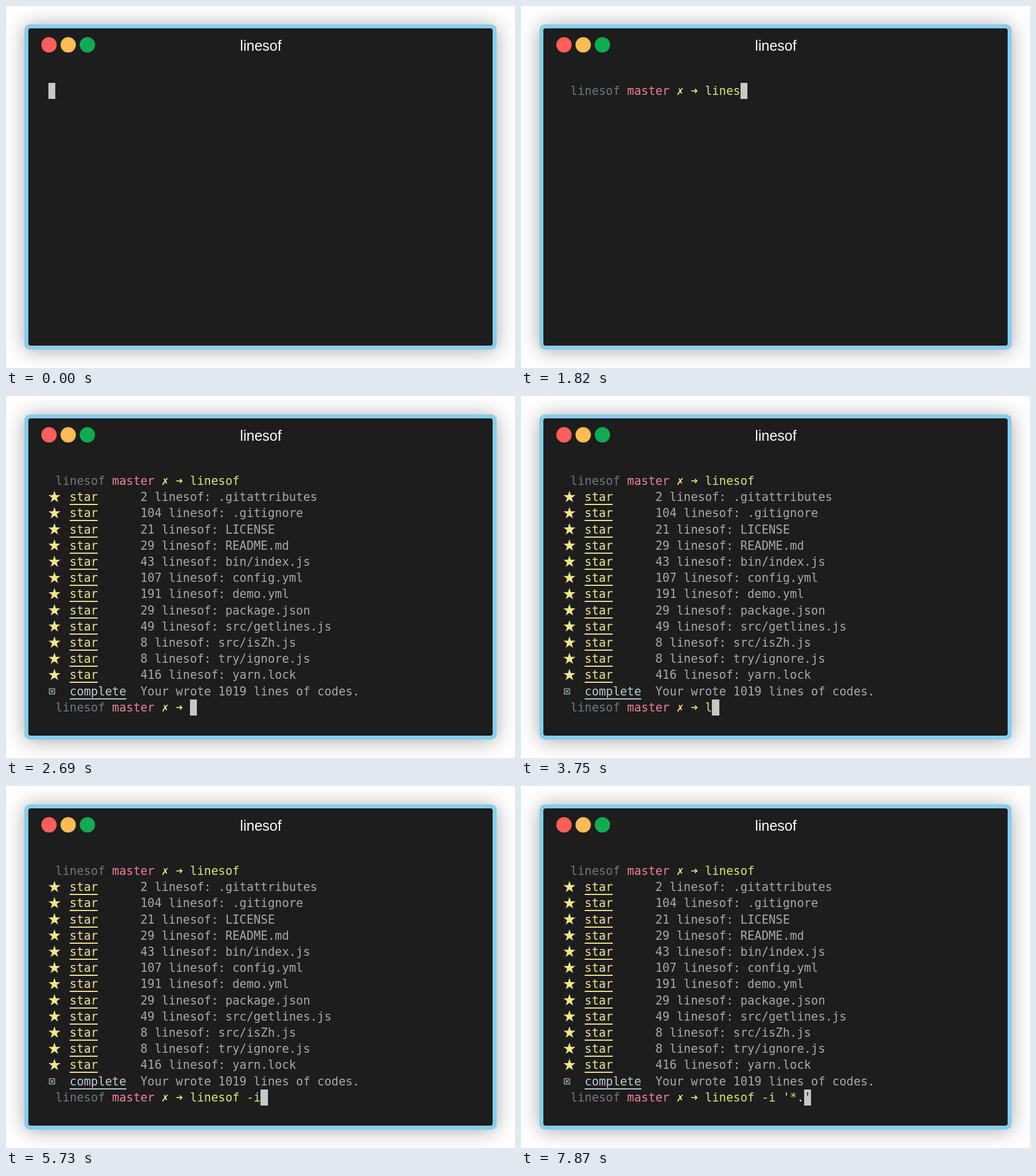
Animation of 888x631 px, one loop 8000 ms. Source, as an HTML page with a canvas:

```html
<!DOCTYPE html>
<html lang="en">
<head>
<meta charset="utf-8">
<title>linesof</title>
<style>
html, body { margin: 0; width: 888px; height: 631px; overflow: hidden; background: #fff; }
canvas { display: block; }
</style>
</head>
<body>
<canvas id="stage" width="888" height="631"></canvas>
<script>
const ctx = document.getElementById('stage').getContext('2d');
const LOOP = 8000;
const LEFT = 74, TOP = 134, CELL = 12.345, ROW = 28.2;
const MONO = '20.5px "DejaVu Sans Mono", monospace';
const COLOR = {
  page: '#fff', border: '#87ceeb', panel: '#1d1d1d', title: '#fff', cursor: '#c5c8c6',
  dim: '#70787a', branch: '#f07f9c', star: '#f0e68c', command: '#d2e878',
  text: '#a9a9a9', done: '#b5cfca'
};

const FILES = [
  [2, '.gitattributes'], [104, '.gitignore'], [21, 'LICENSE'], [29, 'README.md'],
  [43, 'bin/index.js'], [107, 'config.yml'], [191, 'demo.yml'], [29, 'package.json'],
  [49, 'src/getlines.js'], [8, 'src/isZh.js'], [8, 'try/ignore.js'], [416, 'yarn.lock']
];

// Each keystroke: [time, command line]; "|" places the cursor inside the text.
const typed = (text, times) => times.map((time, i) => [time, text.slice(0, i + 1)]);
const FIRST = [[20, ''], ...typed('linesof', [890, 1090, 1150, 1220, 1820, 1930, 2040])];
const SECOND = [
  [2690, ''],
  ...typed("linesof -i '", [3750, 3910, 3960, 4010, 4200, 4440, 4540, 4780, 4870, 5730, 5980, 6100]),
  [6240, "linesof -i ''"], [6560, "linesof -i '|'"], [6920, "linesof -i '*|'"],
  [7320, "linesof -i '*.|'"], [7580, "linesof -i '*|'"], [7870, "linesof -i '*.|'"]
];
// Printed lines over time; 13 includes the summary.
const OUTPUT = [[0, 0], [2300, 1], [2370, 4], [2470, 9], [2580, 13]];

const at = (steps, t) => steps.reduce((value, [time, next]) => t >= time ? next : value, undefined);
const colX = col => LEFT + col * CELL;
const rowY = row => TOP + row * ROW;

function print(text, col, row, color) {
  ctx.font = MONO;
  ctx.textAlign = 'left';
  ctx.fillStyle = color;
  [...text].forEach((char, i) => ctx.fillText(char, colX(col + i), rowY(row) + 21));
}

function underlined(text, col, row, color) {
  print(text, col, row, color);
  ctx.fillRect(Math.round(colX(col)), Math.round(rowY(row) + 26), Math.round(text.length * CELL), 2);
}

function cursor(col, row) {
  const x = Math.round(colX(col)), y = Math.round(rowY(row));
  ctx.fillStyle = COLOR.cursor;
  ctx.fillRect(x, y, Math.round(colX(col + 1)) - x, 28);
}

function star(row) {
  const x = 84.5, y = rowY(row) + 14;
  ctx.beginPath();
  for (let i = 0; i < 10; i++) {
    const r = i % 2 ? 4.3 : 11, a = i * Math.PI / 5;
    ctx.lineTo(x + r * Math.sin(a), y - r * Math.cos(a));
  }
  ctx.fillStyle = COLOR.star;
  ctx.fill();
}

function checkbox(row) {
  const x = 75.5, y = rowY(row) + 9.5, size = 9.5;
  ctx.strokeStyle = COLOR.done;
  ctx.lineWidth = 1.1;
  ctx.strokeRect(x, y, size, size);
  ctx.beginPath();
  ctx.moveTo(x + 2, y + 2);
  ctx.lineTo(x + size - 2, y + size - 2);
  ctx.moveTo(x + size - 2, y + 2);
  ctx.lineTo(x + 2, y + size - 2);
  ctx.stroke();
}

function prompt(row, line, active) {
  print('linesof', 1, row, COLOR.dim);
  print('master', 9, row, COLOR.branch);
  print('✗', 16, row, COLOR.star);
  print('➜', 18, row, COLOR.command);
  const [before, after = ''] = line.split('|');
  print(before + after, 20, row, COLOR.command);
  if (active) {
    cursor(20 + before.length, row);
    print(after, 20 + before.length, row, COLOR.panel);
  }
}

function output(count) {
  FILES.slice(0, count).forEach(([lines, name], i) => {
    star(i + 1);
    underlined('star', 3, i + 1, COLOR.star);
    print(`${lines} linesof: ${name}`, 13, i + 1, COLOR.text);
  });
  if (count > FILES.length) {
    checkbox(count);
    underlined('complete', 3, count, COLOR.done);
    print('Your wrote 1019 lines of codes.', 13, count, COLOR.text);
  }
}

function box(x, y, w, h, radius, color) {
  ctx.beginPath();
  ctx.roundRect(x, y, w, h, radius);
  ctx.fillStyle = color;
  ctx.fill();
}

function terminalWindow() {
  ctx.fillStyle = COLOR.page;
  ctx.fillRect(0, 0, 888, 631);
  ctx.save();
  ctx.shadowColor = 'rgba(0, 0, 0, 0.34)';
  ctx.shadowBlur = 34;
  ctx.shadowOffsetY = 2;
  box(32, 32, 824, 567, 10, COLOR.border);
  ctx.restore();
  box(39, 39, 810, 553, 4, COLOR.panel);
  ['#ff5f58', '#fabc55', '#12aa50'].forEach((color, i) => {
    ctx.beginPath();
    ctx.arc(75 + i * 33.5, 67.7, 13.4, 0, Math.PI * 2);
    ctx.fillStyle = color;
    ctx.fill();
  });
  ctx.font = '25px "Liberation Sans", Arial, sans-serif';
  ctx.textAlign = 'center';
  ctx.fillStyle = COLOR.title;
  ctx.fillText('linesof', 444.5, 77.5);
}

function draw(t) {
  terminalWindow();
  if (t < 20) return cursor(0, 0);
  prompt(0, at(FIRST, t), t < 2240);
  if (t < 2240) return;
  const count = at(OUTPUT, t);
  output(count);
  if (t < 2690) cursor(0, count + 1);
  else prompt(14, at(SECOND, t), true);
}

const start = performance.now();
function frame() {
  draw((performance.now() - start) % LOOP);
  requestAnimationFrame(frame);
}
frame();
</script>
</body>
</html>
```
